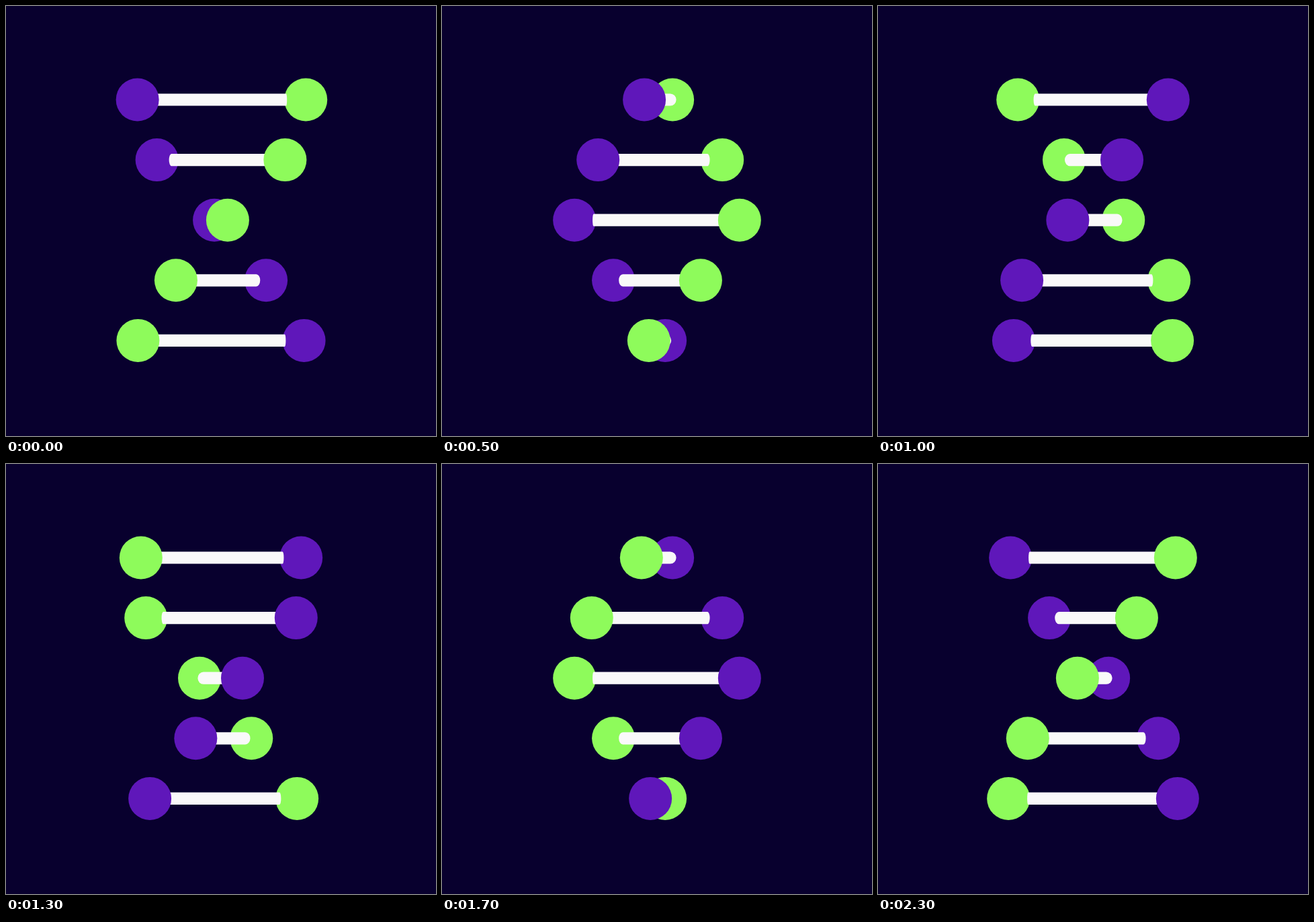
These frames come from a looping animation (640x640 px, 2.4 s). An HTML page with a canvas:

```html
<!DOCTYPE html>
<html lang="en">
<head>
<meta charset="utf-8">
<title>Helix</title>
<style>
  html, body { margin: 0; width: 100%; height: 100%; overflow: hidden; background: #08002e; }
  canvas { display: block; width: 640px; height: 640px; }
</style>
</head>
<body>
<canvas id="stage" width="640" height="640"></canvas>
<script>
const ctx = document.getElementById('stage').getContext('2d');
const LOOP = 2400, STEP = 100;
const TURN = 60, HALF = TURN / 2;   // ticks per full and half turn
const ROWS = 5, ROW_LAG = 7.3, OFFSET = 0.9;
const MID = 320, SPREAD = 127, RADIUS = 32;
const BACKGROUND = '#08002e', PURPLE = '#5f17ba', GREEN = '#8efb5b', WHITE = '#f9f9f9';

function ball(x, y, color) {
  ctx.fillStyle = color;
  ctx.beginPath();
  ctx.arc(x, y, RADIUS, 0, Math.PI * 2);
  ctx.fill();
}

// Bar from the front ball to a cap that flattens as the pair opens
function bar(front, back, y) {
  const side = back >= MID ? 1 : -1;
  const reach = Math.abs(back - MID);
  const end = MID + side * (13 + 0.675 * reach);
  const cap = Math.min(9, 11 - 0.077 * reach);
  const neck = end - side * cap;
  const h = 9.1;
  ctx.fillStyle = WHITE;
  ctx.beginPath();
  ctx.moveTo(front, y - h);
  ctx.lineTo(neck, y - h);
  ctx.ellipse(neck, y, cap, h, 0, -Math.PI / 2, Math.PI / 2, side < 0);
  ctx.lineTo(front, y + h);
  ctx.fill();
}

function rung(row, tick) {
  const y = 139.5 + row * 89.6;
  const turn = (tick - Math.round(row * ROW_LAG) + OFFSET + TURN) % TURN;
  const purpleFront = turn < HALF;
  const angle = (turn % HALF) / HALF * Math.PI;
  const sway = Math.sin(2 * angle);
  const x = SPREAD * Math.cos(angle + 0.086 * sway);
  // the purple ball runs ahead early in its front sweep
  const lead = purpleFront ? 10 * Math.max(0, sway) : 0;
  const front = MID - x + lead, back = MID + x;
  ball(back, y, purpleFront ? GREEN : PURPLE);
  bar(front, back, y);
  ball(front, y, purpleFront ? PURPLE : GREEN);
}

function draw(time) {
  const step = Math.floor((time % LOOP) / STEP);
  const tick = Math.floor(step * STEP * TURN / LOOP);
  ctx.fillStyle = BACKGROUND;
  ctx.fillRect(0, 0, 640, 640);
  for (let row = 0; row < ROWS; row++) rung(row, tick);
}

const start = performance.now();
function loop() {
  draw(performance.now() - start);
  requestAnimationFrame(loop);
}
loop();
</script>
</body>
</html>
```
